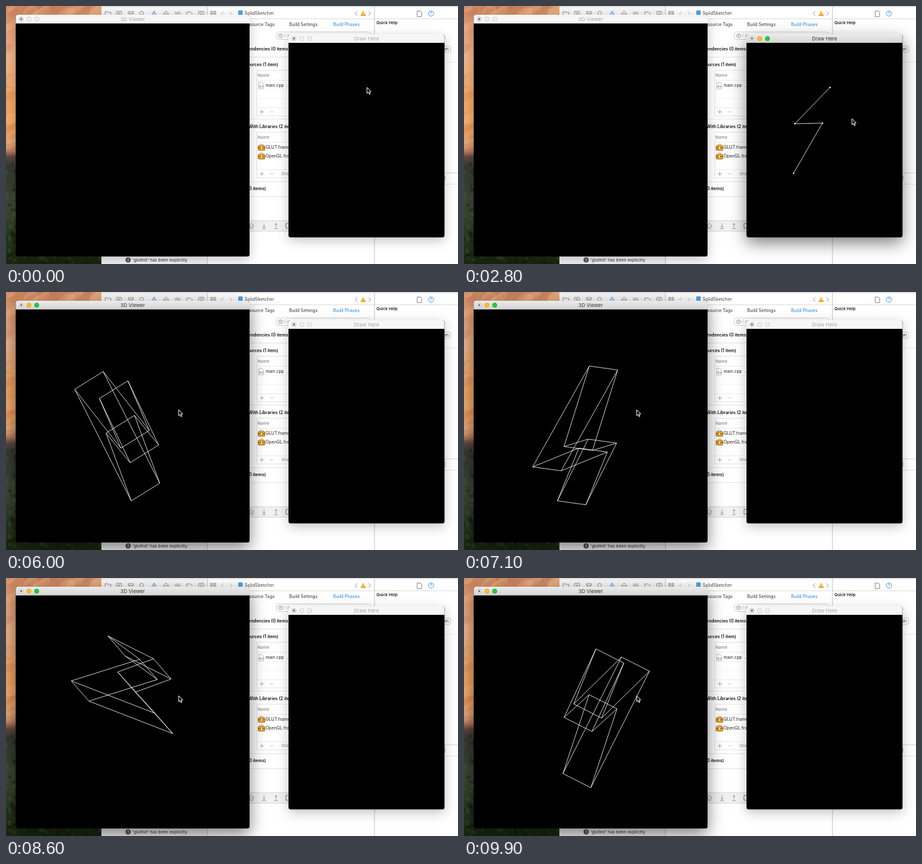
An HTML page with a canvas that plays this animation: 720 px wide and 412 px high, repeating every 10000 ms.

```html
<!DOCTYPE html>
<html lang="en">
<head>
<meta charset="utf-8">
<title>Draw and spin</title>
<style>
html, body { margin: 0; width: 100%; height: 100%; overflow: hidden; background: #fff; }
canvas { display: block; width: 720px; height: 412px; }
</style>
</head>
<body>
<canvas id="stage" width="720" height="412"></canvas>
<script>
const W = 720, H = 412, LOOP = 10000, STEP = 100;
const stage = document.getElementById('stage').getContext('2d');
const FONT = 'Inter, "Open Sans", sans-serif';
const BLUE = '#1d84e0';
let g = stage;

function rect(x, y, w, h, color) {
  g.fillStyle = color;
  g.fillRect(x, y, w, h);
}

function text(str, x, y, size, color = '#222', weight = 400, align = 'left') {
  g.font = `${weight} ${size}px ${FONT}`;
  g.textAlign = align;
  g.textBaseline = 'middle';
  g.fillStyle = color;
  g.fillText(str, x, y);
}

function line(points, color, width = 0.8, closed = false) {
  g.beginPath();
  points.forEach(p => g.lineTo(p[0], p[1]));
  if (closed) g.closePath();
  g.strokeStyle = color;
  g.lineWidth = width;
  g.stroke();
}

function disc(x, y, r, fill, edge) {
  g.beginPath();
  g.arc(x, y, r, 0, 7);
  if (fill) { g.fillStyle = fill; g.fill(); }
  if (edge) { g.strokeStyle = edge; g.lineWidth = 0.8; g.stroke(); }
}

function round(x, y, w, h, r, fill, edge) {
  g.beginPath();
  g.roundRect(x, y, w, h, r);
  if (fill) { g.fillStyle = fill; g.fill(); }
  if (edge) { g.strokeStyle = edge; g.lineWidth = 0.8; g.stroke(); }
}

function chevron(x, y, dir, color = '#777') {
  line([[x - 1.7 * dir, y - 3.5], [x + 1.7 * dir, y], [x - 1.7 * dir, y + 3.5]], color);
}

function plusMinus(y) {
  line([[404, y], [411, y]], '#999');
  line([[407.5, y - 3.5], [407.5, y + 3.5]], '#999');
  line([[420, y], [426, y]], '#bbb');
}

function randomizer(seed) {
  return () => (seed = (seed * 16807) % 2147483647) / 2147483647;
}

function wallpaper() {
  const sky = g.createLinearGradient(0, 0, 0, H);
  [[0, '#c98560'], [0.08, '#e39d76'], [0.2, '#efb48c'], [0.34, '#f3a968'],
   [0.48, '#ee9f5e'], [0.56, '#c58161'], [0.585, '#5d4a41'], [0.62, '#35372f'],
   [0.78, '#3a4632'], [0.9, '#26361f'], [1, '#17260f']]
    .forEach(([at, c]) => sky.addColorStop(at, c));
  rect(0, 0, 153, H, sky);
  const rnd = randomizer(11);
  for (let i = 0; i < 26; i++) {
    const y = rnd() * 220, x = rnd() * 150;
    g.beginPath();
    g.ellipse(i % 2 ? x : rnd() * 16, i % 2 ? rnd() * 12 : y, 9 + rnd() * 12, 3 + rnd() * 7, -0.5, 0, 7);
    g.fillStyle = rnd() < 0.5 ? 'rgba(255,214,160,.22)' : 'rgba(190,105,75,.18)';
    g.fill();
  }
  for (let i = 0; i < 70; i++) {
    const low = i % 3 === 0;
    disc(rnd() * (low ? 152 : 16), low ? 400 + rnd() * 12 : 250 + rnd() * 155, 1 + rnd() * 3,
      rnd() < 0.5 ? 'rgba(10,18,8,.3)' : 'rgba(100,115,70,.2)');
  }
}

function toolIcons() {
  const c = '#777';
  g.lineJoin = 'round';
  line([[158, 9], [158, 16], [167, 16], [167, 10], [162, 10], [161, 9]], c, 0.8, true);
  round(176, 8.5, 8, 7, 1, null, c);
  line([[178, 10], [182, 14]], c);
  line([[182, 10], [178, 14]], c);
  line([[195, 9], [203, 9], [203, 12], [195, 12]], c, 0.8, true);
  line([[197, 12], [197, 16]], c);
  line([[201, 12], [201, 16]], c);
  disc(216, 11.5, 3, null, c);
  line([[218, 14], [221, 17]], c);
  line([[236, 8], [240.5, 16], [231.5, 16]], BLUE, 0.9, true);
  line([[236, 11], [236, 14]], BLUE);
  line([[255, 8], [259.5, 12.5], [255, 17], [250.5, 12.5]], c, 0.8, true);
  line([[252, 12.5], [258, 12.5]], c);
  for (const y of [10, 12.5, 15]) line([[269, y], [278, y]], c);
  line([[288, 9.5], [294, 9.5], [297, 12.5], [294, 15.5], [288, 15.5]], c, 0.8, true);
  round(307, 8.5, 8, 8, 1, null, c);
  line([[309, 11], [313, 11]], c);
  line([[309, 13.5], [313, 13.5]], c);
}

function fileIcon(x, y) {
  line([[x, y], [x + 5, y], [x + 8, y + 3], [x + 8, y + 10], [x, y + 10]], '#aaa', 0.8, true);
  text('c+', x + 1, y + 6, 5, '#4a4fa8', 700);
}

function caseIcon(x, y) {
  round(x + 3, y - 5, 5, 4, 1, null, '#9a6a1c');
  round(x, y - 3, 11, 7.5, 1, '#e0a02c', '#a8701c');
  rect(x, y, 11, 1, '#7d5518');
  rect(x + 4.5, y - 1, 2, 3, '#fff0c0');
}

function ide() {
  rect(152, 0, 568, H, '#fff');
  rect(152, 0, 169, H, '#f6f6f6');
  rect(152, 0, 568, 2, '#e2e2e2');
  rect(152, 20, 568, 0.8, '#d4d4d4');
  rect(320.5, 0, 0.9, H, '#bbb');
  rect(586.5, 0, 0.9, H, '#bbb');
  toolIcons();

  for (const [x, y] of [[326, 8.5], [331, 8.5], [326, 13], [331, 13]]) round(x, y, 3, 3, 0, null, '#777');
  chevron(345, 12, -1, '#aaa');
  chevron(358, 12, 1, '#aaa');
  round(370, 7, 7, 9, 1, '#4da3e8');
  text('SolidSketcher', 380, 12, 7.2, '#444');
  chevron(558, 12, -1);
  chevron(579, 12, 1);
  g.beginPath();
  g.moveTo(569, 7.5); g.lineTo(573.5, 16); g.lineTo(564.5, 16);
  g.fillStyle = '#f6a623'; g.fill();
  rect(568.6, 10.5, 0.9, 3, '#fff');

  text('Resource Tags', 428, 30, 7, '#333', 400, 'right');
  text('Build Settings', 451, 30, 7, '#333');
  text('Build Phases', 521, 30, 7, BLUE);
  round(430.5, 41.5, 150, 12, 3, '#fff', '#c8c8c8');
  disc(437.5, 47.5, 3.3, null, '#888');
  line([[435.7, 46.5], [439.3, 46.5]], '#888');
  line([[436.6, 48.5], [438.4, 48.5]], '#888');
  text('Filter', 443, 48, 7, '#bbb');

  const bold = (s, x, y, align) => text(s, x, y, 6.9, '#111', 600, align);
  bold('Dependencies (0 items)', 452, 69, 'right');
  bold('Compile Sources (1 item)', 433.5, 93.5, 'right');
  bold('With Libraries (2 items)', 386.5, 192.5);
  bold('Copy Files (0 items)', 414, 292, 'right');
  for (const y of [81, 180, 280, 304]) rect(388, y, 198, 0.8, '#ddd');

  for (const [top, bottom] of [[102, 175], [201, 274]]) {
    rect(399, top, 170, bottom - top, '#fff');
    round(399.5, top + 0.5, 170, bottom - top, 0, null, '#ddd');
    text('Name', 400.5, top + 8.5, 6.8, '#777');
    rect(399, top + 16, 170, 0.7, '#e4e4e4');
    rect(399, bottom - 13, 170, 0.7, '#e4e4e4');
    plusMinus(bottom - 6);
  }
  rect(400, 133.5, 168, 0.6, '#eee');
  rect(400, 147, 168, 0.6, '#eee');
  fileIcon(402.5, 122);
  text('main.cpp  ...in SolidSketcher', 413.5, 127, 6.7);
  caseIcon(401.5, 226);
  caseIcon(401.5, 240);
  text('GLUT.framework', 413.5, 226, 6.9);
  text('OpenGL.framework', 413.5, 240, 6.9);
  text('Drag to reorder', 439, 268, 6.7, '#888');

  rect(321, 343, 266, 16, '#f1f1f1');
  rect(321, 342.5, 266, 0.8, '#ccc');
  rect(321, 359, 266, 0.8, '#ccc');
  line([[387, 351], [391, 347], [395, 351], [393, 351], [393, 355], [389, 355], [389, 351]], '#888', 0.8, true);
  for (const [x, d] of [[411, 1], [430, -1]]) {
    line([[x, 347], [x, 354]], '#888');
    line([[x - 2, 350.5 + d], [x, 350.5 + 3.5 * d], [x + 2, 350.5 + d]], '#888');
    line([[x - 3, 355.5], [x + 3, 355.5]], '#888');
  }
  round(446, 347, 8, 8, 1, null, '#555');

  line([[655, 8], [660, 8], [662, 10], [662, 17], [655, 17]], '#666', 0.8, true);
  disc(677, 12, 4.2, null, BLUE);
  text('?', 677, 12.4, 6.5, BLUE, 500, 'center');
  text('Quick Help', 590, 27.5, 6.4, '#222', 600);
  text('No help for this setting', 700, 49, 7, '#ccc', 400, 'right');
  round(640, 64, 68, 10, 2, '#fff', '#bbb');
  text('Documentation', 705, 69, 6.8, '#333', 400, 'right');
  rect(587, 89, 133, 0.7, '#e0e0e0');
  rect(587, 266, 133, 0.8, '#ccc');
  rect(587, 284, 133, 0.8, '#ddd');
  round(692, 271, 7, 8, 1, null, '#777');

  disc(194.5, 405.5, 4.2, '#555');
  text('!', 194.5, 405.7, 6.5, '#fff', 700, 'center');
  text("'glutInit' has been explicitly", 201.5, 405.5, 6.8, '#333');
}

function frame(x, y, w, h, title, active) {
  g.save();
  g.shadowColor = active ? 'rgba(0,0,0,.5)' : 'rgba(0,0,0,.24)';
  g.shadowBlur = active ? 26 : 18;
  g.shadowOffsetY = active ? 9 : 5;
  round(x, y, w, h, 3.5, '#000');
  g.restore();
  let fill = '#f6f6f6';
  if (active) {
    fill = g.createLinearGradient(0, y, 0, y + 14);
    fill.addColorStop(0, '#ebebeb');
    fill.addColorStop(1, '#d4d4d4');
  }
  round(x, y, w, 13.7, [3.5, 3.5, 0, 0], fill);
  rect(x, y + 13.3, w, 0.7, active ? '#b4b4b4' : '#d8d8d8');
  const cy = y + 7, colors = active ? ['#fdbc2e', '#28c840'] : ['#f0f0f0', '#f0f0f0'];
  disc(x + 8.7, cy, 3.5, '#ececec', '#b8b8b8');
  disc(x + 8.7, cy, 1.4, '#555');
  disc(x + 21, cy, 3.5, colors[0], active ? '#dfa023' : '#cacaca');
  disc(x + 33.4, cy, 3.5, colors[1], active ? '#1aab29' : '#cacaca');
  text(title, x + w / 2, cy + 0.4, 8, active ? '#333' : '#a8a8a8', 400, 'center');
}

// Outline as clicked in the drawing window, with the click times
const bolt = [[583, 130], [527, 188], [571, 187], [525, 267], [628, 174], [544, 181]];
const clicks = [400, 1300, 1700, 2400, 3100, 3900];
const CLOSED = 4900, BUILT = 5100;

const path = [
  [0, 575, 130], [100, 581, 129], [500, 581, 129], [900, 525, 187], [1300, 525, 187],
  [1600, 569, 186], [1800, 569, 186], [2300, 523, 266], [2500, 523, 266], [2800, 618, 180],
  [2900, 626, 173], [3200, 626, 173], [3700, 542, 180], [4400, 542, 180], [4700, 580, 129],
  [5200, 580, 129], [5400, 275, 188]
];

function pointerAt(t) {
  const i = path.findIndex(k => k[0] > t);
  if (i < 0) return path[path.length - 1].slice(1);
  const [t0, x0, y0] = path[i - 1], [t1, x1, y1] = path[i];
  const k = (t - t0) / (t1 - t0);
  return [x0 + (x1 - x0) * k, y0 + (y1 - y0) * k];
}

function pointer(x, y) {
  const shape = [[0, 0], [0, 9.5], [2.2, 7.6], [3.8, 11], [5.3, 10.3], [3.8, 7], [6.6, 6.8]];
  g.beginPath();
  shape.forEach(p => g.lineTo(x + p[0], y + p[1]));
  g.closePath();
  g.fillStyle = '#000';
  g.fill();
  g.strokeStyle = '#fff';
  g.lineWidth = 1;
  g.stroke();
}

function sketch(t) {
  const shown = bolt.filter((p, i) => t >= clicks[i]);
  if (shown.length > 1) line(shown, '#fff', 0.8, t >= CLOSED);
  shown.forEach(([x, y]) => rect(x - 1, y - 1, 2, 2, '#fff'));
}

function solid(t) {
  const rad = Math.PI / 180;
  const pitch = Math.min(318, Math.max(0, 60.2 + 0.119 * (t - 6000))) * rad;
  const yaw = (234.3 - 0.121 * Math.max(0, t - 8400)) * rad;
  const project = depth => bolt.map(([px, py]) => {
    const x = 1.5 * (px - 574), y = 1.5 * (py - 214);
    const z = depth * Math.cos(yaw) - x * Math.sin(yaw);
    return [202 + x * Math.cos(yaw) + depth * Math.sin(yaw),
            214 + y * Math.cos(pitch) - z * Math.sin(pitch)];
  });
  const front = project(0), back = project(55.8);
  line(front, '#fff', 0.8, true);
  line(back, '#fff', 0.8, true);
  front.forEach((p, i) => line([p, back[i]], '#fff'));
}

const backdrop = document.createElement('canvas');
backdrop.width = W;
backdrop.height = H;
g = backdrop.getContext('2d');
wallpaper();
ide();
g = stage;

function draw(t) {
  g.drawImage(backdrop, 0, 0);
  frame(15.5, 14, 372.5, 386, '3D Viewer', t >= 5600);
  frame(450, 45, 248.5, 324.5, 'Draw Here', t >= 300 && t < 5600);
  if (t < BUILT) sketch(t);
  else solid(t);
  pointer(...pointerAt(t));
}

const start = performance.now();
let last = -1;
function tick() {
  const t = Math.floor(((performance.now() - start) % LOOP) / STEP) * STEP;
  if (t !== last) draw(last = t);
  requestAnimationFrame(tick);
}
tick();
</script>
</body>
</html>
```
